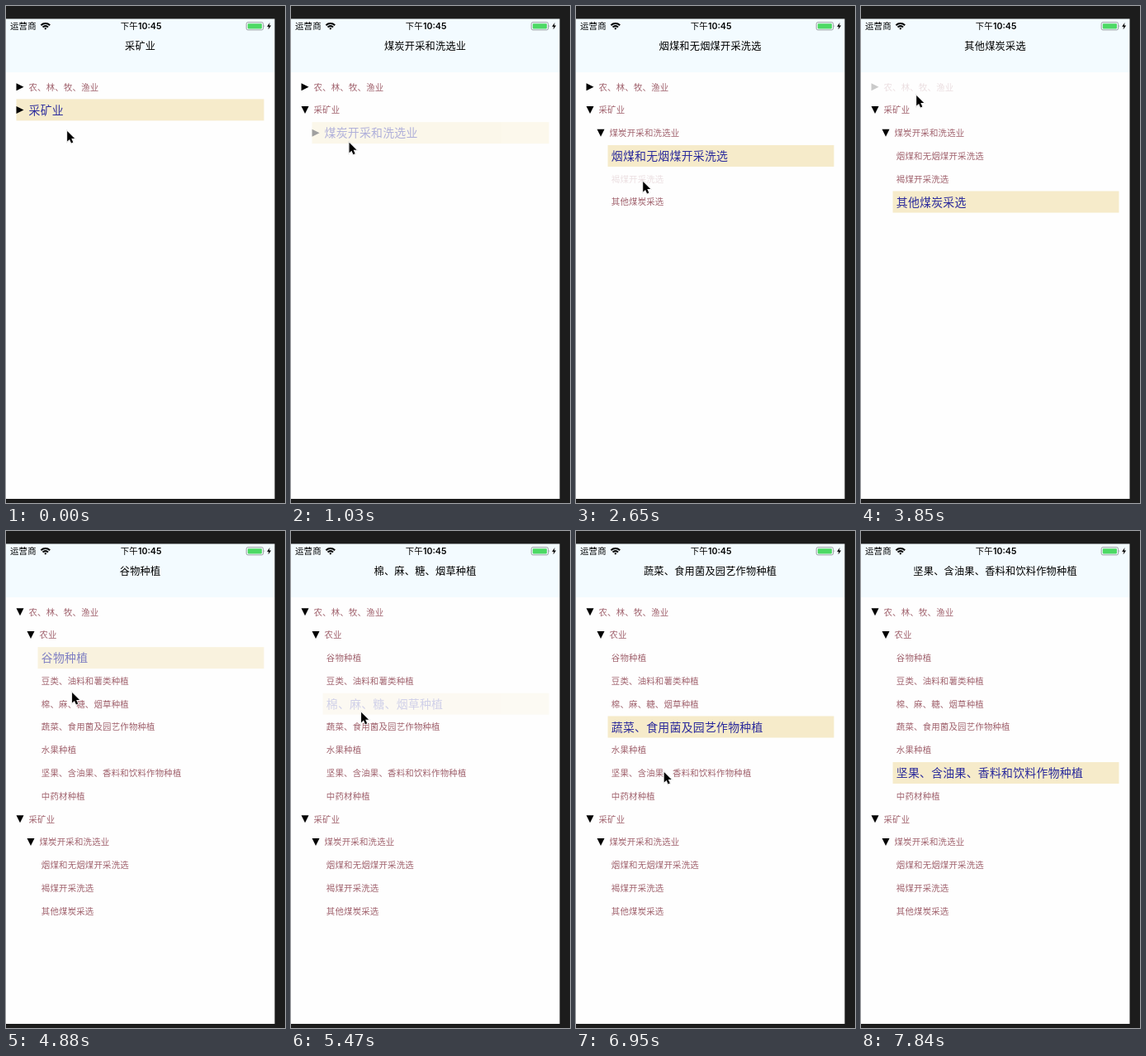
Animation of 338 by 600 pixels, one loop 8290 ms. Source, as an HTML page:

```html
<!DOCTYPE html>
<html lang="zh-CN">
<head>
<meta charset="utf-8">
<style>
html, body { margin: 0; height: 100%; overflow: hidden; background: #1c1c1c; }
svg { display: block; width: 100vw; height: 100vh; }
text { font-family: "Noto Sans CJK SC", "Noto Sans CJK", sans-serif; letter-spacing: .018em; }
.clock { font: 600 10.6px Inter, sans-serif; letter-spacing: 0; }
</style>
</head>
<body>
<svg viewBox="0 0 338 600">
  <rect y="15.5" width="325.5" height="64.5" fill="#f3fbff"/>
  <rect y="80" width="325.5" height="515" fill="#fefefe"/>
  <g id="status">
    <text x="5" y="28" font-size="10.4">运营商</text>
    <g fill="none" stroke="#000" stroke-width="2">
      <path d="M42.4 23.2a8 8 0 0 1 10.8 0M44.5 25.6a5 5 0 0 1 6.6 0"/>
      <path d="M46.3 26.9L47.8 28.7 49.3 26.9a2.4 2.4 0 0 0-3 0Z" fill="#000" stroke="none"/>
    </g>
    <text x="138.8" y="28" font-size="10.4" font-weight="500">下午</text>
    <text x="160" y="28.4" class="clock">10:45</text>
    <rect x="291.2" y="19.7" width="20.4" height="9.2" rx="1.8" fill="none" stroke="#92979a" stroke-width=".9"/>
    <rect x="292.8" y="21.2" width="17.2" height="6.2" rx=".8" fill="#4cd964"/>
    <path d="M312.6 22.7q1.5 1.5 0 3.2Z" fill="#92979a"/>
    <path d="M319.6 20L316.2 24.9H318.4L317.6 28.6 321.2 23.5H318.9Z"/>
  </g>
  <text id="title" x="162.6" text-anchor="middle" y="53.2" font-size="12.2"></text>
  <g id="list"></g>
  <path id="cursor" d="M.7 1V13.6l2.9-2.7 2 4.6 2.2-.9-2-4.5h3.9Z" stroke="#fff" stroke-width="1.6"
    paint-order="stroke" style="filter:drop-shadow(0 .6px .7px #0005)"/>
</svg>
<script>
const LOOP = 8290, STEP = 147.92, LAST = 53;
const HOLD = 270, FADE = 250, OPEN_DELAY = 225, TRAVEL = 400;

const tree = [
  ['农、林、牧、渔业', [
    ['农业', [['谷物种植'], ['豆类、油料和薯类种植'], ['棉、麻、糖、烟草种植'], ['蔬菜、食用菌及园艺作物种植'],
      ['水果种植'], ['坚果、含油果、香料和饮料作物种植'], ['中药材种植']]]]],
  ['采矿业', [
    ['煤炭开采和洗选业', [['烟煤和无烟煤开采洗选'], ['褐煤开采洗选'], ['其他煤炭采选']]]]]
];

// each tap: row, release time, pointer position
const taps = [
  ['采矿业', -220, 73, 140],
  ['煤炭开采和洗选业', 955, 73.5, 151],
  ['烟煤和无烟煤开采洗选', 1850, 66, 177],
  ['褐煤开采洗选', 2760, 80.5, 211],
  ['其他煤炭采选', 3320, 84, 239],
  ['农、林、牧、渔业', 3950, 66.5, 107],
  ['农业', 4350, 70, 129],
  ['谷物种植', 4757, 74, 157],
  ['棉、麻、糖、烟草种植', 5450, 82, 212],
  ['蔬菜、食用菌及园艺作物种植', 6450, 96.5, 247],
  ['坚果、含油果、香料和饮料作物种植', 7220, 106, 290]
].map(([name, time, x, y]) => ({ name, time, x, y }));
const exit = { x: 245, y: 579 };

const $ = id => document.getElementById(id);
const clamp = u => Math.max(0, Math.min(1, u));
const ease = u => (u = clamp(u)) < .5 ? 2 * u * u : 1 - 2 * (1 - u) ** 2;
const easeOut = u => 1 - (1 - clamp(u)) ** 3;
const mix = (a, b, u) => a + (b - a) * u;
const tapOn = name => taps.find(tap => tap.name === name);

function opacity(name, t) {
  const tap = tapOn(name);
  if (!tap) return 1;
  return t < tap.time
    ? mix(1, .2, ease((t - tap.time + HOLD) / 150))
    : mix(.2, 1, ease((t - tap.time) / FADE));
}

function rows(nodes, t, depth = 0) {
  return nodes.flatMap(([name, kids]) => {
    const open = kids && t >= tapOn(name).time + OPEN_DELAY;
    return [{ name, kids, open, depth }, ...(open ? rows(kids, t, depth + 1) : [])];
  });
}

function rowMarkup(row, i, selected, t) {
  const x = 12.5 + 13 * row.depth, y = 84.6 + 27.78 * i, mid = y + 13;
  const on = row.name === selected, size = on ? 13.9 : 10.43;
  const arrow = row.open ? 'l9 0l-4.5 9Z' : 'l9 4.5l-9 4.5Z';
  return `<g opacity="${opacity(row.name, t)}">` +
    (on ? `<rect x="${x}" y="${y}" width="${312.5 - x}" height="26" fill="#f6ebca"/>` : '') +
    (row.kids ? `<path d="M${x} ${mid - 4.4}${arrow}"/>` : '') +
    `<text x="${x + (row.kids ? 15 : 4.3)}" y="${mid + .375 * size}" font-size="${size}" ` +
    `fill="${on ? '#2a2a9c' : '#a0626d'}">${row.name}</text></g>`;
}

function draw(now) {
  const step = Math.min(LAST, Math.floor((now % LOOP + 13) / STEP)), t = step * STEP;
  const last = taps.findLastIndex(tap => tap.time <= t);
  const from = taps[last], to = taps[last + 1] || exit, u = easeOut((t - from.time) / TRAVEL);
  $('title').textContent = from.name;
  $('list').innerHTML = rows(tree, t).map((row, i) => rowMarkup(row, i, from.name, t)).join('');
  $('cursor').setAttribute('transform', `translate(${mix(from.x, to.x, u)} ${mix(from.y, to.y, u)})`);
  $('cursor').setAttribute('visibility', step < LAST ? 'visible' : 'hidden');
}

const start = performance.now();
function tick() {
  draw(performance.now() - start);
  requestAnimationFrame(tick);
}
tick();
</script>
</body>
</html>
```
